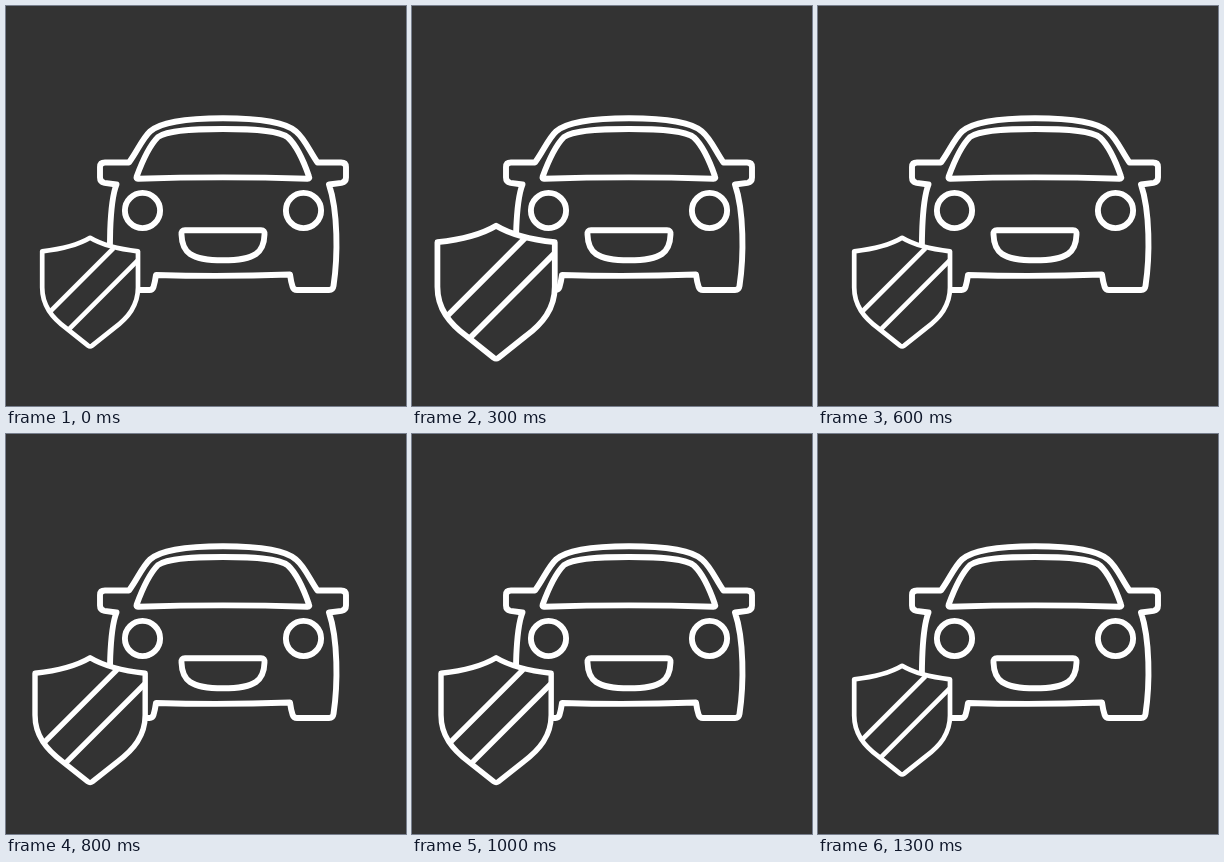
These frames come from a looping animation (400x400 px, 1400 ms). An HTML page:

```html
<!DOCTYPE html>
<html lang="en">
<head>
<meta charset="utf-8">
<title>Car insurance icon</title>
<style>
  html, body { margin: 0; width: 100%; height: 100%; overflow: hidden; background: #333; }
  svg { display: block; width: 100vw; height: 100vh; }
</style>
</head>
<body>
<svg viewBox="0 0 400 400" fill="none" stroke="#fff" stroke-width="5.9" stroke-linejoin="round">
  <rect width="400" height="400" fill="#333" stroke="none"/>
  <g id="car">
    <path d="M123 156.500 H99 Q94 156.500 94 161 V171.500 Q94 176 98.500 176.800 L110.500 178.500
      C103.500 196 102 250 106.500 280 Q107 284 111 284 H143.500 Q146.500 284 147.500 281 Q149 276 150 269
      Q217 271 284 268.500 Q285 276 286.700 281 Q287.700 284 291 284 H323 Q327 284 327.500 280
      C332 250 332 205 323 178.500 L335.500 176.800 Q340 176 340 171.500 V161 Q340 156.500 335 156.500
      H311.500 C304 146 299 133 290 125.500 C278 114.500 245 112.200 217 112.200
      C189 112.200 156 114.500 144 125.500 C136 133 131 146 123 156.500 Z"/>
    <path d="M132 172.700 Q217 170 301.500 172.700 Q304 172.700 303 170.500 C298 156 292 141 282 131.500
      C273 124 245 123 217 123 C189 123 161 124 152 131
      C143 140 136 156 130.700 170.500 Q130 172.700 132 172.700 Z"/>
    <path d="M179 224.300 H255 Q259 224.300 258.500 228.500 C258 246 250 254.300 217 254.300
      C184 254.300 176 246 175.500 228.500 Q175 224.300 179 224.300 Z"/>
  </g>
  <g id="open">
    <circle cx="136.500" cy="204.500" r="17.600"/>
    <circle cx="297.500" cy="204.500" r="17.600"/>
  </g>
  <path id="shut" stroke-width="5.400" d="M116 205 H157 M277 205 H318"/>
  <g id="shield" stroke-width="4.700">
    <path fill="#333" d="M0 -53.800 C13 -46 28 -42.500 47.900 -40.300 V-4 C47.900 14 38 26 24 36.500
      L2 54 Q0 55.500 -2 54 L-24 36.500 C-38 26 -47.900 14 -47.900 -4 V-40.300
      C-28 -42.500 -13 -46 0 -53.800 Z"/>
    <path d="M-40.500 20.500 L23.500 -43.500 M-22 38.500 L47.900 -31.400"/>
  </g>
</svg>
<script>
  const LOOP = 1400, STEP = 100, HALF = 3, GROWTH = 0.075;
  const get = id => document.getElementById(id);
  const shield = get("shield"), open = get("open"), shut = get("shut");

  function draw(ms) {
    const step = Math.floor((ms % LOOP) / STEP);
    // Two pulses, then a short rest
    const level = step < 12 ? HALF - Math.abs(HALF - step % 6) : 0;
    const scale = 1 + GROWTH * level;
    shield.setAttribute("transform", `translate(84.100 285.600) scale(${scale})`);
    const blink = step === 11 || step === 12;
    open.style.display = blink ? "none" : "";
    shut.style.display = blink ? "" : "none";
  }

  const start = performance.now();
  function tick() {
    draw(performance.now() - start);
    requestAnimationFrame(tick);
  }
  tick();
</script>
</body>
</html>
```
